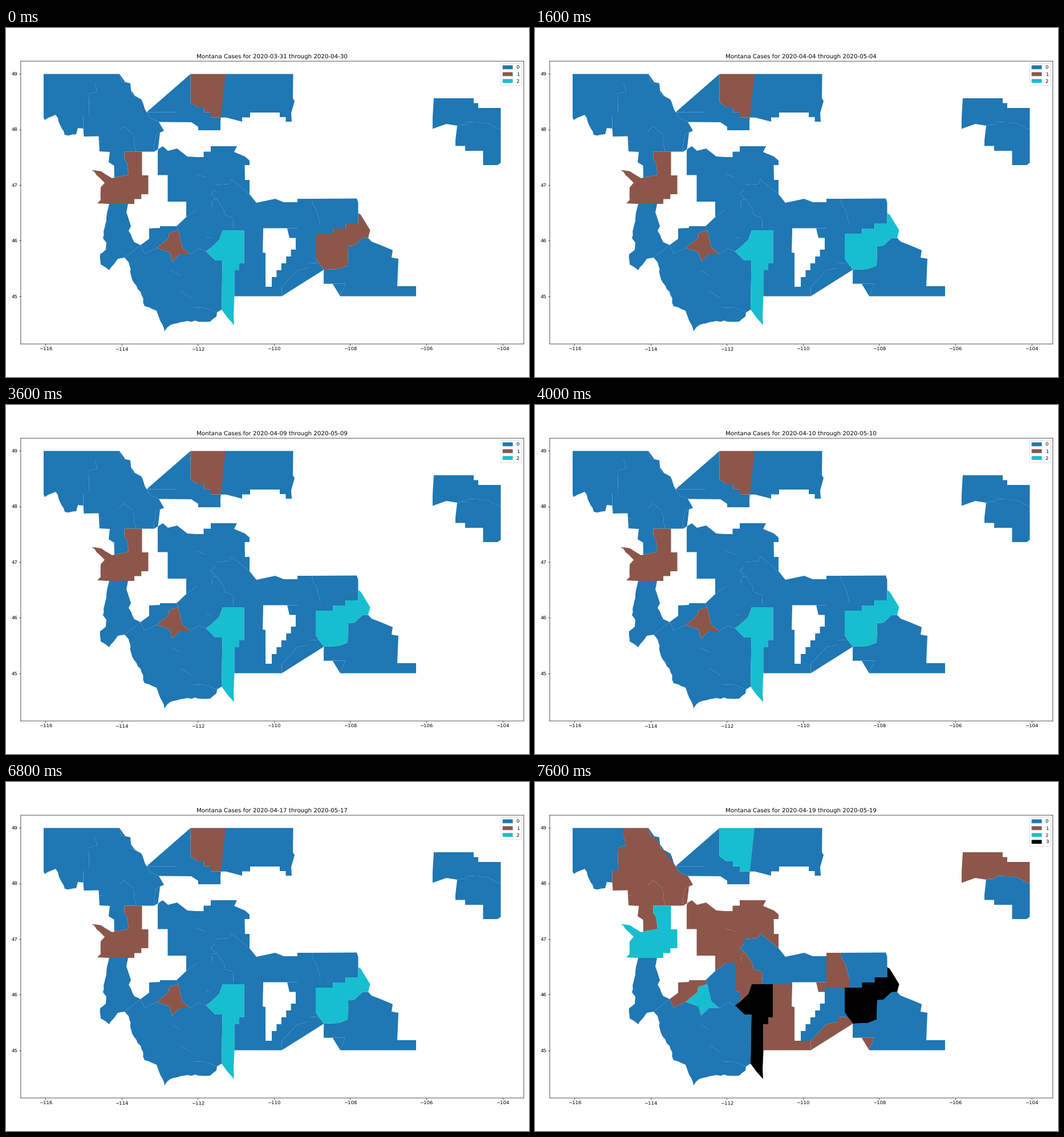
Write a matplotlib script that moves like this. It is 917 by 611 pixels and loops after 8000 ms.

```python
import math

import matplotlib.pyplot as plt
import numpy as np
from matplotlib.animation import FuncAnimation
from matplotlib.patches import Patch, Polygon

plt.rcParams.update({"path.snap": False, "text.hinting": "none"})

WIDTH, HEIGHT, DPI = 917, 611, 61.13
FRAMES, INTERVAL = 20, 400
YELLOWSTONE_RISE, STATE_RISE = 4, 18
COLORS = ["#1f77b4", "#8c564b", "#17becf", "#000000"]
LEFT, RIGHT, CEIL, FLOOR = 25.9, 907.9, 58.1, 553.1
TOP, BOTTOM = 80.5, 469.6

fig = plt.figure(figsize=((WIDTH + 0.01) / DPI, (HEIGHT + 0.01) / DPI), dpi=DPI,
                 facecolor="white")
ax = fig.add_axes([LEFT / WIDTH, 1 - FLOOR / HEIGHT,
                   (RIGHT - LEFT) / WIDTH, (FLOOR - CEIL) / HEIGHT])
ax.set_xlim(LEFT, RIGHT)
ax.set_ylim(FLOOR, CEIL)

# Ticks in degrees, placed on a stage measured in pixels.
lons, lats = range(-116, -103, 2), range(45, 50)
ax.set_xticks([69.4 + 66.76 * (lon + 116) for lon in lons],
              [f"\u2212{-lon}" for lon in lons])
ax.set_yticks([TOP + 97.3 * (49 - lat) for lat in lats], [str(lat) for lat in lats])

rng = np.random.default_rng(7)
counties = []


def line(*keys):
    return list(keys)


def stairs(a, b, count, across=True):
    """Equal survey-line steps from a to b."""
    xs, ys = (np.linspace(a[i], b[i], count + 1) for i in (0, 1))
    path = [a]
    for i in range(count):
        path += [(xs[i + 1], ys[i]) if across else (xs[i], ys[i + 1]),
                 (xs[i + 1], ys[i + 1])]
    return path


def rough(*keys, size=0.8):
    """A river or ridge through the key points, with small seeded bends."""
    path = [keys[0]]
    for a, b in zip(keys, keys[1:]):
        count = max(1, int(math.dist(a, b) / 6))
        for t in np.arange(1, count) / count:
            bend = rng.normal(0, size, 2)
            path.append(tuple(np.array(a) * (1 - t) + np.array(b) * t + bend))
        path.append(b)
    return path


def join(pieces):
    """Chain border pieces, turning each so that it starts near the last end."""
    first, second = pieces[:2]

    def gap(point):
        return min(math.dist(point, second[0]), math.dist(point, second[-1]))

    path = list(first) if gap(first[-1]) <= gap(first[0]) else first[::-1]
    for piece in pieces[1:]:
        flip = math.dist(path[-1], piece[-1]) < math.dist(path[-1], piece[0])
        path += piece[::-1] if flip else piece
    return path


def county(level, rise, *pieces):
    """Add a county with its class and the later rise of that class."""
    patch = Polygon(join(pieces), closed=True, linewidth=0, edgecolor="none")
    ax.add_patch(patch)
    counties.append((patch, level, level + rise))
    return patch


# Borders shared by neighbours
lincoln_flathead = line((155, TOP), (155, 95), (160, 111), (145, 115), (146, 155),
                        (135.5, 155), (135.5, 176))
glacier_flathead = rough((199, TOP), (203, 95), (218, 97), (220, 116), (237, 125),
                         (246.5, 147.5))
pondera_flathead = line((246.5, 147.5), (253, 158), (268, 164.5))
glacier_pondera = line((246.5, 147.5), (298, 147.5), (298, 130), (323.5, 130))
toole_pondera = line((323.5, 130)) + stairs((336, 139), (359, 156.5), 2)
lake_flathead = (line((163, 199), (170, 198), (170, 181), (198, 181))
                 + rough((207, 172), (224, 185), (228, 216.5)))
lewis_flathead = line((260, 216.5), (259, 207), (263, 187), (270, 183))
lake_missoula = line((207.5, 216.5), (207.5, 229), (212, 236), (215, 257), (190, 262))
ravalli_beaverhead = line((236, 380), (208, 402))
deer_silver = line((302, 354), (286, 359), (285, 368), (264, 385))
deer_beaverhead = line((264, 385), (243, 395), (236, 380))
silver_beaverhead = line((264, 385), (287, 393), (291, 409))
silver_jefferson = line((302, 354), (309, 384), (323, 396))
silver_madison = line((323, 396), (305, 396), (291, 409))
madison_beaverhead = line((291, 409), (291, 425), (306, 433), (306, 461), (325, 473),
                          (325, 489), (350, 490), (370, 498))
jefferson_madison = line((323, 396), (338, 386), (350.5, 391))
gallatin_madison = line((350.5, 391), (367, 407), (379.5, 407), (378, 493))
lewis_jefferson = line((316, 331), (335, 317), (351, 317))
broadwater_jefferson = line((351, 317), (351, 366), (359, 368), (359, 385))
broadwater_gallatin = line((359, 385), (374, 371), (380, 354))
lewis_broadwater = line((370, 300), (362, 301), (361, 317), (351, 317))
lewis_cascade = line((334, 226), (334, 256), (351, 262), (351, 283), (367, 283))
lewis_meagher = line((367, 283), (359, 291), (370, 300))
cascade_meagher = line((367, 283), (367, 275), (392, 273), (395, 265), (427, 291))
broadwater_meagher = line((370, 300), (382, 318), (383, 327), (399, 333), (398, 354))
gallatin_park = (line((417.5, 354)) + stairs((417.5, 412), (400.5, 436), 2)
                 + line((400.5, BOTTOM)))
golden_musselshell = line((536, 299), (538, 309), (545, 320), (551, 345), (551, 360))
yellowstone_musselshell = stairs((551, 360), (617.5, 333), 3) + line((617.5, 324))
yellowstone_stillwater = line((543, 360), (543, 403), (548, 411))
yellowstone_carbon = line((548, 411), (557.5, 423))
yellowstone_big_horn = line((557.5, 423), (583, 422), (599, 416), (600, 382), (611, 381),
                            (625, 368), (635, 367.5))
stillwater_carbon = line((548, 411), (530, 412), (530, 420), (511, 424), (483.5, 453))
carbon_big_horn = line((557.5, 423), (557, 447.5), (595, 447.5), (586, BOTTOM))
roosevelt_richland = rough((867.5, 178), (841, 166), (811, 164), (805, 170), (791, 171))

# Lincoln
county(0, 0, lincoln_flathead,
       rough((126, 175), (123, 186), (103, 187), (87, 152), (68, 161)),
       line((66, 157), (66, TOP)))
# Flathead
county(0, 1, lincoln_flathead, glacier_flathead, pondera_flathead, line((277, 180)),
       lewis_flathead, lake_flathead, line((162.5, 189.5), (136.5, 190)))
# Glacier
county(0, 0, line((323.5, TOP)), glacier_flathead, glacier_pondera)
# Pondera
county(0, 0, pondera_flathead, glacier_pondera, toole_pondera,
       line((376, 156.5), (376, 179), (337, 179), (337, 173), (325, 165)))
# Toole
county(1, 1, toole_pondera, line((385, 156.5), (385, TOP), (323.5, TOP)))
# Liberty
county(0, 0, line((385, TOP), (420, TOP)), stairs((420, 156.5), (414, 164), 1),
       line((376, 164), (376, 156.5), (385, 156.5)))
# Hill
county(0, 0, line((420, TOP), (503.5, TOP), (503, 123), (506, 128), (500, 149)),
       stairs((501, 164), (480, 148), 2), stairs((428, 148), (420, 156.5), 1, False))
# Lake
county(0, 1, lake_flathead, lake_missoula,
       line((189.5, 241), (180, 235), (182, 217), (164, 216)))
# Missoula
county(1, 1, lake_missoula,
       rough((186, 263), (167, 251), (150, 249), (173, 271), (166, 279), (166, 301),
             (160, 307)),
       line((181, 308)), stairs((225, 308), (249.5, 291), 2, False),
       line((249.5, 258), (238.5, 258), (238.5, 216.5)))
# Ravalli
county(0, 0, line((181, 308), (214, 308)),
       rough((211, 323), (219, 347), (215, 355), (225, 375)), ravalli_beaverhead,
       rough((196, 404), (181, 424), (166, 414), (165, 396), (175, 388), (176, 376),
             (170, 368), (178, 320)))
# Lewis and Clark
county(0, 1, lewis_flathead, line((275, 207), (284, 215), (300, 211), (318, 225)),
       lewis_cascade, lewis_meagher, lewis_broadwater, lewis_jefferson,
       stairs((316, 304), (283.5, 291), 1), stairs((283.5, 257.5), (266, 217), 1))
# Cascade
county(0, 1, lewis_cascade, cascade_meagher,
       line((427, 266), (419, 266), (418.5, 240), (427, 240), (427, 232), (419, 225),
            (400, 217), (405, 207)),
       stairs((359, 207), (334, 226), 2, False))
# Meagher
county(0, 0, cascade_meagher, line((439, 306), (451, 303.5), (451, 354)),
       broadwater_meagher, lewis_meagher)
# Broadwater
county(0, 1, broadwater_meagher, broadwater_gallatin, broadwater_jefferson,
       lewis_broadwater)
# Jefferson
county(0, 0, lewis_jefferson, broadwater_jefferson, jefferson_madison, silver_jefferson,
       line((299, 347)))
# Deer Lodge
county(0, 1, line((299, 347)), deer_silver, deer_beaverhead,
       line((251, 369), (251, 351), (270, 350), (270, 347)))
# Silver Bow
county(1, 1, silver_jefferson, silver_madison, silver_beaverhead, deer_silver)
# Beaverhead
county(0, 0, deer_beaverhead, silver_beaverhead, madison_beaverhead,
       rough((369, 505), (358, 514), (318, 513), (288, 520), (278, 531), (264, 495),
             (243, 487), (236, 462), (221, 440), (215, 410)), ravalli_beaverhead)
# Madison
county(0, 0, silver_madison, jefferson_madison, gallatin_madison, madison_beaverhead)
# Gallatin
county(2, 1, broadwater_gallatin, gallatin_madison,
       line((389, 508), (400, 520), (399, 503)), gallatin_park)
# Park
county(0, 1, gallatin_park, line((483.5, BOTTOM)), stairs((483.5, 453), (455, 394), 1),
       line((450, 393), (451, 354)))
# Wheatland
county(0, 0, line((451, 303.5), (472, 299), (487, 305), (511, 305)),
       line((511, 350.5), (451, 350.5)))
# Golden Valley
county(0, 1, golden_musselshell, line((508, 360), (508, 367.5), (497, 367.5)),
       line((493, 350.5), (511, 350.5), (511, 299)))
# Musselshell
county(0, 0, golden_musselshell, yellowstone_musselshell, line((617.5, 306), (615, 298.5)))
# Stillwater
county(0, 0, line((508, 360)), yellowstone_stillwater, stillwater_carbon,
       line((466, 453)), stairs((466, 436), (508, 376), 5))
# Carbon
county(0, 1, stillwater_carbon, line((483.5, BOTTOM)), carbon_big_horn,
       yellowstone_carbon)
# Big Horn
county(0, 0, yellowstone_big_horn,
       line((641, 374), (659, 381), (678, 389), (676, 402), (688, 404)),
       stairs((686, 452), (719, BOTTOM), 1), carbon_big_horn)
yellowstone = county(1, 2, yellowstone_musselshell, line((622, 327), (638.5, 354)),
                     yellowstone_big_horn, yellowstone_carbon, yellowstone_stillwater)
# Roosevelt
county(0, 1, roosevelt_richland, line((772, 168), (748, 176.5), (748, 157), (750, 123)),
       stairs((812, 123), (828, 140), 2), line((867.5, 140)))
# Richland
county(0, 0, roosevelt_richland, line((788, 197)), stairs((788, 206.5), (805, 215), 1),
       line((836.5, 215), (836.5, 240), (862, 240), (867.5, 236)))


def update(frame):
    risen = frame >= STATE_RISE
    for patch, start, end in counties:
        level = end if risen else start
        if patch is yellowstone and YELLOWSTONE_RISE <= frame < STATE_RISE:
            level = 2
        patch.set_facecolor(COLORS[level])
    first_day = np.datetime64("2020-03-31") + frame
    ax.set_title(f"Montana Cases for {first_day} through {first_day + 30}")
    ax.legend(handles=[Patch(color=color, label=str(level))
                       for level, color in enumerate(COLORS[:4 if risen else 3])],
              loc="upper right")
    return []


anim = FuncAnimation(fig, update, frames=FRAMES, interval=INTERVAL, repeat=True,
                     repeat_delay=0, init_func=lambda: update(0), blit=False)
plt.show()
```
